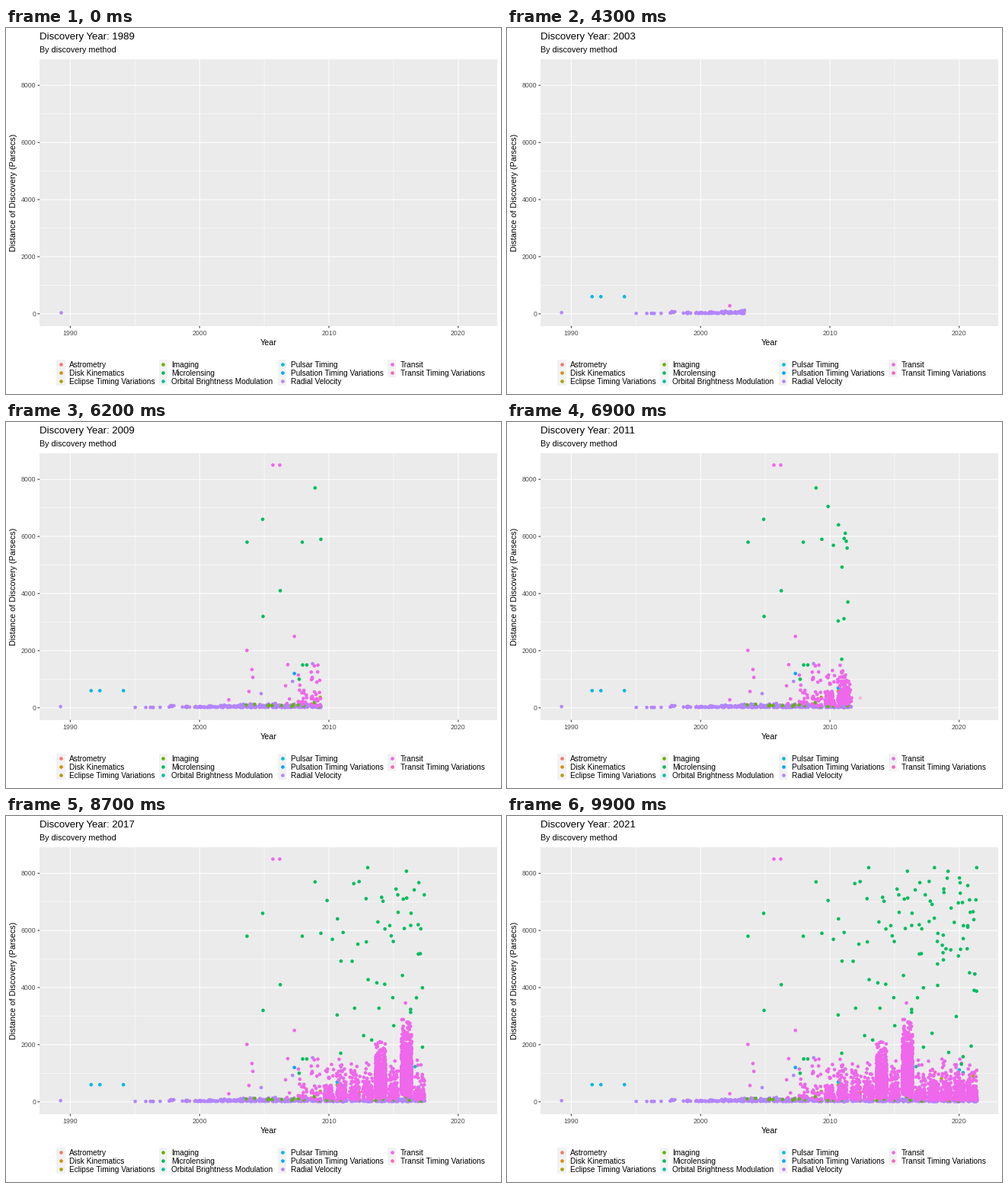
Animation, 650 px wide and 480 px high, one loop 10000 ms. Source, as a matplotlib script:

```python
import numpy as np
import matplotlib.pyplot as plt
from matplotlib.animation import FuncAnimation
from matplotlib.colors import to_rgb
from matplotlib.patches import Rectangle

W, H, DPI = 650, 480, 100
PX = 72 / DPI                       # one pixel in points
FRAMES, FIRST, LAST = 100, 1989, 2021
LEFT, RIGHT, TOP, BOTTOM = 44.2, 644.5, 40.6, 390.7

plt.rcParams["font.family"] = "Liberation Sans"
rng = np.random.default_rng(7)

METHODS = {
    "Astrometry": "#F8766D",
    "Disk Kinematics": "#DB8E00",
    "Eclipse Timing Variations": "#AEA200",
    "Imaging": "#64B200",
    "Microlensing": "#00BD5C",
    "Orbital Brightness Modulation": "#00C1A7",
    "Pulsar Timing": "#00BADE",
    "Pulsation Timing Variations": "#00A6FF",
    "Radial Velocity": "#B385FF",
    "Transit": "#EF67EB",
    "Transit Timing Variations": "#FF63B6",
}
# Drawing order within a year: the common methods cover the rare ones
COMMON = ["Radial Velocity", "Transit", "Microlensing"]
STACK = COMMON[:1] + [m for m in METHODS if m not in COMMON] + COMMON[1:]

# Isolated discoveries: (jittered year, parsecs)
LANDMARKS = {
    "Radial Velocity": [
        (1989.25, 40), (1995.02, 13), (1996.2, 14), (1995.84, 13), (1996.35, 15),
        (1996.42, 12), (1996.95, 17), (2004.76, 497), (2007.19, 925), (2008.74, 1544)],
    "Pulsar Timing": [(1991.61, 600), (1992.29, 600), (1994.11, 600)],
    "Pulsation Timing Variations": [(2007.33, 1200)],
    "Microlensing": [
        (2003.67, 5800), (2004.88, 6600), (2004.91, 3200), (2006.24, 4100),
        (2007.94, 5800), (2007.97, 1500), (2008.29, 1500), (2007.7, 1000),
        (2008.93, 7700), (2009.38, 5900), (2009.86, 7050), (2010.27, 5690),
        (2010.64, 3040)],
    "Transit": [
        (2002.26, 280), (2003.66, 2010), (2004.05, 1340), (2004.12, 1065),
        (2003.82, 570), (2005.67, 8500), (2006.2, 8500), (2006.76, 148),
        (2006.95, 310), (2007.33, 2500), (2006.82, 1510), (2006.65, 770),
        (2015.92, 3460), (2021.2, 4478)],
}
# method: first year, years between finds, finds, median parsecs
RARE = {
    "Imaging": (2004, 1, 2, 100),
    "Eclipse Timing Variations": (2009, 2, 1, 450),
    "Pulsar Timing": (2011, 3, 2, 900),
    "Orbital Brightness Modulation": (2011, 3, 1, 1000),
    "Transit Timing Variations": (2012, 2, 1, 600),
    "Pulsation Timing Variations": (2014, 2, 1, 800),
    "Astrometry": (2013, 6, 1, 300),
    "Disk Kinematics": (2019, 3, 1, 800),
}
# Big survey releases: count, median, farthest
SURVEYS = {2014: (800, 650, 2250), 2016: (1400, 900, 2900)}


def x_at(year):
    return 84.4 + (np.asarray(year) - 1990) * 16.98


def y_at(parsecs):
    return 374.8 - np.asarray(parsecs) * 0.03745


def place(year, dist):
    """Stage positions, the year jittered sideways."""
    return np.column_stack([x_at(year + rng.uniform(-0.4, 0.4, len(dist))), y_at(dist)])


def spread(n, median, sigma, low, high):
    """n log-normal distances between low and high."""
    d = median * np.exp(sigma * rng.standard_normal(8 * n + 20))
    return d[(d > low) & (d < high)][:n]


def velocity(year):
    t = year - 1998
    return spread(min(50, 6 + 4 * t), 32 + t, 0.5 + 0.015 * t, 3, 120 + 35 * t)


def transit(year):
    if year in SURVEYS:
        n, median, far = SURVEYS[year]
        return spread(n, median, 0.52, 60, far)
    n = min(14 * 2 ** (year - 2008), 90) if year < 2018 else 170
    return spread(n, 400 if year < 2016 else 270, 0.8, 60, 1500)


def lensing(year):
    """Mostly near the galactic bulge, the rest anywhere on the way there."""
    n = int(1 + 0.2 * (year - 2004) ** 1.5)
    bulge = rng.normal(6700, 800, n).clip(4500, 8200)
    return np.where(rng.random(n) < 0.65, bulge, rng.uniform(800, 6000, n))


def build():
    data = {m: {} for m in METHODS}

    def add(method, year, pts):
        old = data[method].get(year, np.empty((0, 2)))
        data[method][year] = np.vstack([old, pts])

    for method, finds in LANDMARKS.items():
        for year, d in finds:
            add(method, round(year), [(x_at(year), y_at(d))])
    for method, (start, step, n, median) in RARE.items():
        for year in range(start, LAST + 1, step):
            add(method, year, place(year, spread(n, median, 0.6, 5, 1300)))
    for method, start, rule in (("Radial Velocity", 1998, velocity),
                                ("Transit", 2008, transit),
                                ("Microlensing", 2011, lensing)):
        for year in range(start, LAST + 1):
            add(method, year, place(year, rule(year)))
    return data


DATA = build()
YEARS = sorted({y for d in DATA.values() for y in d})
KEYS = [round((y - FIRST) * (FRAMES - 1) / (LAST - FIRST)) for y in YEARS]
NONE = np.empty((0, 2))


def rgba(method, n, alpha=1.0):
    return np.tile((*to_rgb(METHODS[method]), alpha), (n, 1))


def settled(year):
    groups = [(m, DATA[m][year]) for m in STACK if year in DATA[m]]
    return (np.vstack([p for _, p in groups]),
            np.vstack([rgba(m, len(p)) for m, p in groups]))


def moving(k, f):
    """Points on their way from year k to the next; unmatched ones fade in."""
    pos, col = [], []
    for m in STACK:
        a, b = (DATA[m].get(y, NONE) for y in YEARS[k:k + 2])
        n = min(len(a), len(b))
        pos += [a[:n] + (b[:n] - a[:n]) * f, b[n:]]
        col += [rgba(m, n), rgba(m, len(b) - n, f)]
    return np.vstack(pos), np.vstack(col)


PAST = [settled(y) for y in YEARS]

fig = plt.figure(figsize=(W / DPI, H / DPI), dpi=DPI, facecolor="white")
ax = fig.add_axes([0, 0, 1, 1])
ax.set_xlim(0, W)
ax.set_ylim(H, 0)
ax.axis("off")


def text(x, y, s, size, color="black", ha="left", **kw):
    return ax.text(x, y, s, fontsize=size * PX, color=color, ha=ha,
                   va="baseline", **kw)


def line(xs, ys, color, width):
    ax.plot(xs, ys, color=color, lw=width * PX, snap=False,
            solid_capstyle="butt", zorder=1)


def box(x0, y0, x1, y1, color):
    ax.add_patch(Rectangle((x0, y0), x1 - x0, y1 - y0, fc=color, lw=0, zorder=0))


def dots(pos, color):
    return ax.scatter(pos[:, 0], pos[:, 1], s=(4.6 * PX) ** 2, c=color,
                      linewidths=0, zorder=3)


box(LEFT, TOP, RIGHT, BOTTOM, "#EBEBEB")
for year in (1995, 2005, 2015):
    line([x_at(year)] * 2, [TOP, BOTTOM], "white", 0.53)
for d in range(1000, 8000, 2000):
    line([LEFT, RIGHT], [y_at(d)] * 2, "white", 0.53)
for year in range(1990, 2021, 10):
    x = x_at(year)
    line([x, x], [TOP, BOTTOM], "white", 1.07)
    line([x, x], [BOTTOM, BOTTOM + 2.75], "#333333", 1.07)
    text(x, 403, str(year), 8.8, "#4D4D4D", "center")
for d in range(0, 8001, 2000):
    y = y_at(d)
    line([LEFT, RIGHT], [y, y], "white", 1.07)
    line([LEFT - 2.75, LEFT], [y, y], "#333333", 1.07)
    text(39.2, y + 3.2, str(d), 8.8, "#4D4D4D", "right")

title = text(44, 15, "", 13.2)
text(44, 32, "By discovery method", 10.8)
text(344.3, 416, "Year", 10.8, ha="center")
text(13.3, 216, "Distance of Discovery (Parsecs)", 10.8, ha="center",
     rotation=90, rotation_mode="anchor")

for i, (name, color) in enumerate(METHODS.items()):
    x = (72, 206.4, 362.6, 506.8)[i // 3]
    y = 440.9 + 11.1 * (i % 3)
    box(x - 5.6, y - 5.55, x + 5.6, y + 5.55, "#F2F2F2")
    dots(np.array([[x, y]]), color)
    text(x + 11, y + 4, name, 10.1)

points = dots(*PAST[0])


def update(i):
    year = round(FIRST + (LAST - FIRST) * i / (FRAMES - 1))
    title.set_text(f"Discovery Year: {year}")
    k = max(j for j, key in enumerate(KEYS) if key <= i)
    layers = PAST[:k + 1]
    if i > KEYS[k]:
        layers = layers + [moving(k, (i - KEYS[k]) / (KEYS[k + 1] - KEYS[k]))]
    points.set_offsets(np.vstack([p for p, _ in layers]))
    points.set_facecolors(np.vstack([c for _, c in layers]))
    return points, title


anim = FuncAnimation(fig, update, frames=FRAMES, interval=100, repeat=True,
                     repeat_delay=0, blit=False)
plt.show()
```
